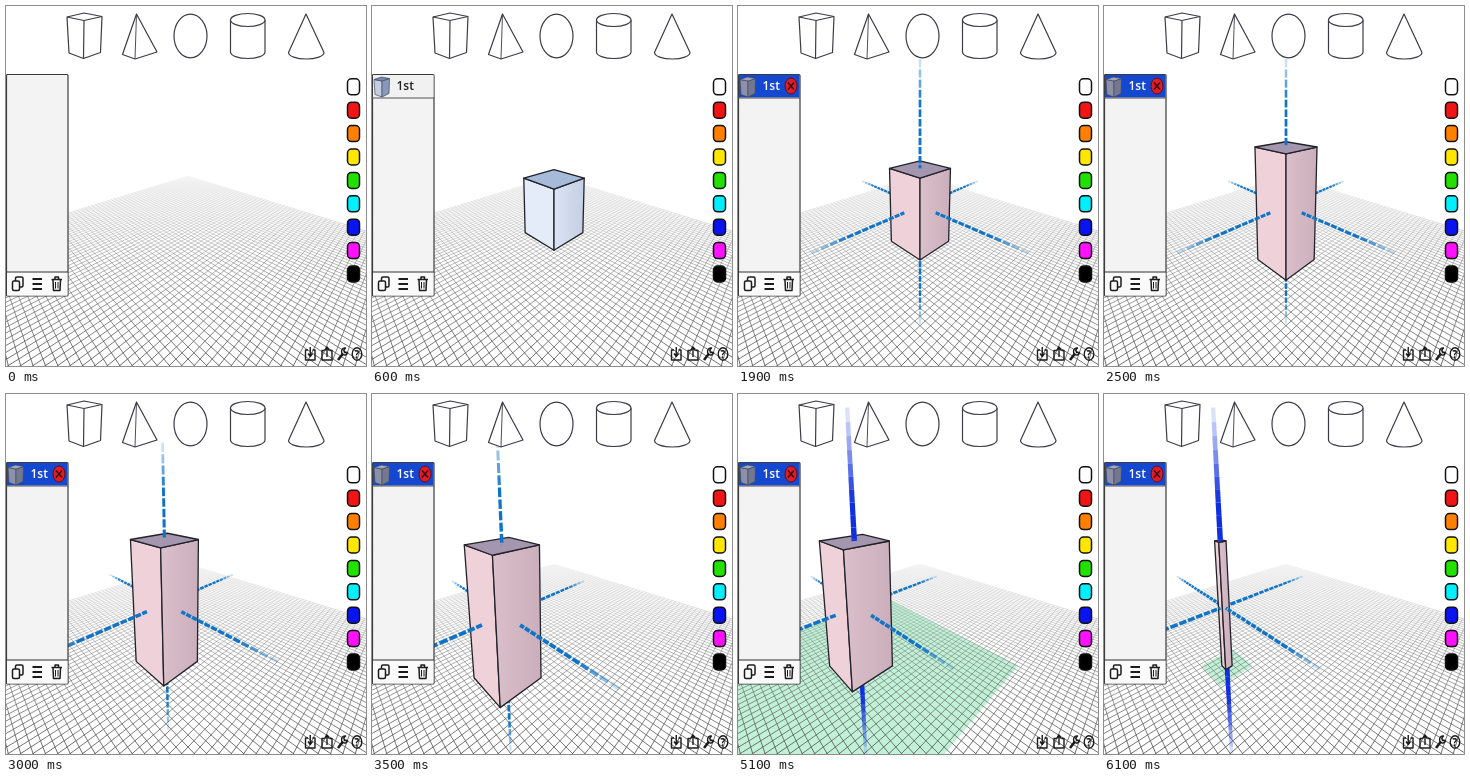
Animation of 360 by 360 pixels, one loop 6200 ms. Source, as an HTML page:

```html
<!DOCTYPE html>
<html lang="en">
<head>
<meta charset="utf-8">
<title>Shape editor</title>
<style>
html, body { margin: 0; width: 100%; height: 100%; overflow: hidden; background: #fff; }
svg { display: block; width: 100vw; height: 100vh; }
text { font-family: "Open Sans", "Noto Sans", sans-serif; }
</style>
</head>
<body>
<svg viewBox="0 0 360 360">
  <defs>
    <linearGradient id="fade" gradientUnits="userSpaceOnUse" x1="0" y1="168" x2="0" y2="360">
      <stop offset="0" stop-color="#777" stop-opacity=".04"/>
      <stop offset=".2" stop-color="#777" stop-opacity=".2"/>
      <stop offset=".5" stop-color="#6c6c6c" stop-opacity=".55"/>
      <stop offset="1" stop-color="#5c5c5c" stop-opacity=".95"/>
    </linearGradient>
    <linearGradient id="cool"><stop stop-color="#dbe4f4"/><stop offset="1" stop-color="#c4cfe3"/></linearGradient>
    <linearGradient id="warm"><stop stop-color="#dac0ca"/><stop offset="1" stop-color="#cbaebb"/></linearGradient>
  </defs>
  <rect width="360" height="360" fill="#fff"/>
  <g id="patch"></g>
  <path id="grid" fill="none" stroke="url(#fade)" stroke-width=".95"/>
  <g id="scene" stroke-linejoin="round"></g>

  <g fill="#fff" stroke="#3c3c48" stroke-width="1.200" stroke-linejoin="round">
    <path d="M61 11L78 7L96 10.500L94.500 46.500L77.500 52.500L63 47Z"/>
    <path d="M61 11L78 14.500L96 10.500M78 14.500L77.500 52.500" fill="none"/>
    <path d="M130.500 8L116.500 48.500L129 53L151 46Z"/>
    <path d="M130.500 8L129 53" fill="none" stroke-width=".9"/>
    <ellipse cx="184.500" cy="30" rx="16.500" ry="21.800"/>
    <path d="M224.500 14V46A17.200 6.500 0 0 0 259 46V14"/>
    <ellipse cx="241.750" cy="14" rx="17.250" ry="6.500"/>
    <path d="M300 8L282.500 46.500A17.700 6.500 0 0 0 318 46.500Z"/>
  </g>

  <rect x=".5" y="68.500" width="61.500" height="221.500" rx="1" fill="#f3f3f3" stroke="#3c3c3c" stroke-width="1.200"/>
  <g id="row"></g>
  <path d="M1 266H61.500V289.500H1Z" fill="#fafafa"/>
  <path d="M0 266H62" stroke="#333" stroke-width="1.200"/>
  <g fill="none" stroke="#1c1c1c" stroke-width="1.500" stroke-linejoin="round">
    <rect x="9.500" y="271" width="7.500" height="10" rx="1.500"/>
    <rect x="6.500" y="275" width="7" height="9.500" rx="1.500" fill="#fafafa"/>
    <path d="M26.500 273H36M26.500 278H36M26.500 283H36" stroke-width="2"/>
    <path d="M45.500 273.500H56M49 273V271H52.500V273M47 274L47.500 284.500H54L54.500 274"/>
    <path d="M49.500 276V282.500M52 276V282.500" stroke-width="1"/>
  </g>

  <g id="swatches" stroke="#111" stroke-width="1.500"></g>

  <g fill="none" stroke="#1c1c1c" stroke-width="1.400" stroke-linejoin="round">
    <path d="M302 344H299.500V354H309V344H306.500M304.250 341V350M302 347.500L304.250 350.500L306.500 347.500"/>
    <path d="M318.500 344.500H316V354H326V344.500H323.500M321 351V341.500M318.700 344.500L321 341L323.300 344.500"/>
    <path d="M332 354L337 347.500" stroke-width="2.600"/>
    <path d="M339.500 342A3 3.600 0 1 0 341.500 346.500L338.500 346.500L337.800 344Z"/>
    <ellipse cx="351" cy="348" rx="4.800" ry="6.200"/>
  </g>
  <text x="351" y="351.800" font-size="10" font-weight="700" text-anchor="middle" fill="#1c1c1c">?</text>
  <g id="touch" fill="none"></g>
</svg>
<script>
const LOOP = 6200, STEP = 100;
const $ = id => document.getElementById(id);
const r = v => v.toFixed(2);

// Vanishing points: two floor directions and the vertical.
const RX = 428, LX = -64, MX = 182, HY = 94, VY = 1370;

// Perspective of (a: back right, b: back left, u: up) seen from screen height y0.
function proj(a, b, u, y0 = 200) {
  const w = 1 + a + b - u;
  return {
    x: (MX + RX * a + LX * b - MX * u) / w,
    y: (y0 + HY * (a + b) - VY * u) / w,
    w
  };
}
const pt = p => r(p.x) + " " + r(p.y);
const poly = (pts, attrs) => `<path d="M${pts.map(pt).join("L")}Z" ${attrs}/>`;

function drawGrid() {
  const cell = 0.00721, near = 0.9, top = 170;
  let d = "";
  for (let s = 0; s < near; s += cell) {
    d += `M${pt(proj(-s, 0, 0, top))}L${pt(proj(-s, s - near, 0, top))}`;
    d += `M${pt(proj(0, -s, 0, top))}L${pt(proj(s - near, -s, 0, top))}`;
  }
  $("grid").setAttribute("d", d);
}

function drawSwatches() {
  const colors = ["#fff", "#f01414", "#ff8000", "#ffe600", "#22e000", "#00efff", "#0a14f0", "#ff10ff", "#000"];
  $("swatches").innerHTML = colors.map((c, i) =>
    `<rect x="341.500" y="${r(72.8 + i * 23.4)}" width="12" height="16" rx="4" fill="${c}"/>`).join("");
}

function ease(t, from, to, v0, v1) {
  const p = Math.min(1, Math.max(0, (t - from) / (to - from)));
  return v0 + (v1 - v0) * p * p * (3 - 2 * p);
}

function stateAt(t) {
  return {
    shown: t >= 600,
    picked: t >= 1400,
    upright: t >= 4300,
    plane: t >= 4900,
    a: ease(t, 2600, 3400, 0, -0.1665),
    b: ease(t, 3600, 4200, 0, 0.059),
    tall: ease(t, 1600, 2400, 0.0233, 0.048),
    half: ease(t, 5200, 6100, 0.06, 0.0098)
  };
}

// One axis arm, cut into dashes that get thinner outwards and fade at the tip.
function arm(s, dir, start, solid) {
  const n = 16, color = solid ? "#1030e0" : "#0f74c8";
  const at = f => proj(s.a + dir[0] * f, s.b + dir[1] * f, dir[2] * f);
  let out = "";
  for (let i = 0; i < n; i++) {
    const f0 = Math.max(start, i / n), f1 = (i + (solid ? 1 : 0.8)) / n;
    if (f1 <= f0) continue;
    const p = at(f0), q = at(f1);
    const width = (solid ? 5.4 * (1 - 0.4 * f0) : 3.2 * (1 - 0.35 * f0)) / p.w;
    const alpha = Math.min(1, (1 - f0) * (solid ? 2.2 : 3.5));
    out += `<path d="M${pt(p)}L${pt(q)}" stroke="${color}" stroke-width="${r(width)}" opacity="${r(alpha)}"/>`;
  }
  return out;
}

function box(s) {
  const { half: h, tall: u } = s;
  const c = (i, j, k) => proj(s.a + i * h, s.b + j * h, k * u);
  const [left, right, top] = s.picked ? ["#efd2d9", "url(#warm)", "#a496ae"] : ["#e4ecfa", "url(#cool)", "#a6bbd9"];
  const line = 'stroke="#22222a" stroke-width="1.300" fill=';
  return poly([c(-1, 1, 1), c(-1, -1, 1), c(-1, -1, -1), c(-1, 1, -1)], `${line}"${left}"`) +
    poly([c(-1, -1, 1), c(1, -1, 1), c(1, -1, -1), c(-1, -1, -1)], `${line}"${right}"`) +
    poly([c(-1, 1, 1), c(1, 1, 1), c(1, -1, 1), c(-1, -1, 1)], `${line}"${top}"`);
}

function scene(s) {
  if (!s.shown) return "";
  if (!s.picked) return box(s);
  const len = 0.31, up = s.upright ? 0.131 : 0.113;
  const out = s.half / len, cap = s.tall / up;
  return arm(s, [len, 0, 0], 0) + arm(s, [0, len, 0], 0) +
    arm(s, [0, 0, -up], cap, s.upright) + box(s) +
    arm(s, [-len, 0, 0], out) + arm(s, [0, -len, 0], out) +
    arm(s, [0, 0, up], cap, s.upright);
}

function patch(s) {
  if (!s.plane) return "";
  const g = s.half * 5;
  const c = (i, j) => proj(s.a + i * g, s.b + j * g, -s.tall);
  return poly([c(-1, 1), c(1, 1), c(1, -1), c(-1, -1)], 'fill="#3fd583" fill-opacity=".32"');
}

function row(s) {
  if (!s.shown) return "";
  const on = s.picked;
  const [left, right, top] = on ? ["#8c90a8", "#74788f", "#a3a8bd"] : ["#c3cee2", "#8798b8", "#7589ad"];
  return `<rect x="1" y="69" width="60.500" height="22.500" fill="${on ? "#1548d0" : "#f1f1f1"}"/>
    <path d="M0 92H62" stroke="#555" stroke-width="1"/>
    <g stroke="#444b5c" stroke-width=".7" stroke-linejoin="round">
    <path d="M2 73.500L10 75V91L3 88.500Z" fill="${left}"/>
    <path d="M10 75L17.500 72.500L17 87.500L10 91Z" fill="${right}"/>
    <path d="M2 73.500L9.500 71L17.500 72.500L10 75Z" fill="${top}"/></g>
    <text x="24.500" y="83.500" font-size="12" font-weight="600" fill="${on ? "#fff" : "#222"}">1st</text>` +
    (on ? `<ellipse cx="53" cy="80" rx="6" ry="8" fill="#e01c24" stroke="#5a1020" stroke-width="1"/>
    <path d="M50 76.500L56 83.500M56 76.500L50 83.500" stroke="#3a0a10" stroke-width="1.500"/>` : "");
}

const ring = (y, size, look) =>
  `<ellipse cx="180" cy="${r(y)}" rx="${r(size)}" ry="${r(size * 1.32)}" ${look}/>`;

function touch(t) {
  if (t >= 1100 && t < 1400) return ring(208.5, 2.7, 'stroke="#e23c3c" stroke-width="1.200"');
  if (t >= 4300 && t < 4700) {
    const look = 'stroke="#ee9c9c" stroke-width="2.500"';
    return ring(134, 12.7, look) + ring(214, 12.7, look);
  }
  return "";
}

let last = -1;
function draw(t) {
  if (t === last) return;
  last = t;
  const s = stateAt(t);
  $("patch").innerHTML = patch(s);
  $("scene").innerHTML = scene(s);
  $("row").innerHTML = row(s);
  $("touch").innerHTML = touch(t);
}

const begin = performance.now();
function tick() {
  const t = (performance.now() - begin) % LOOP;
  draw(Math.floor(t / STEP) * STEP);
  requestAnimationFrame(tick);
}
drawGrid();
drawSwatches();
draw(0);
requestAnimationFrame(tick);
</script>
</body>
</html>
```
